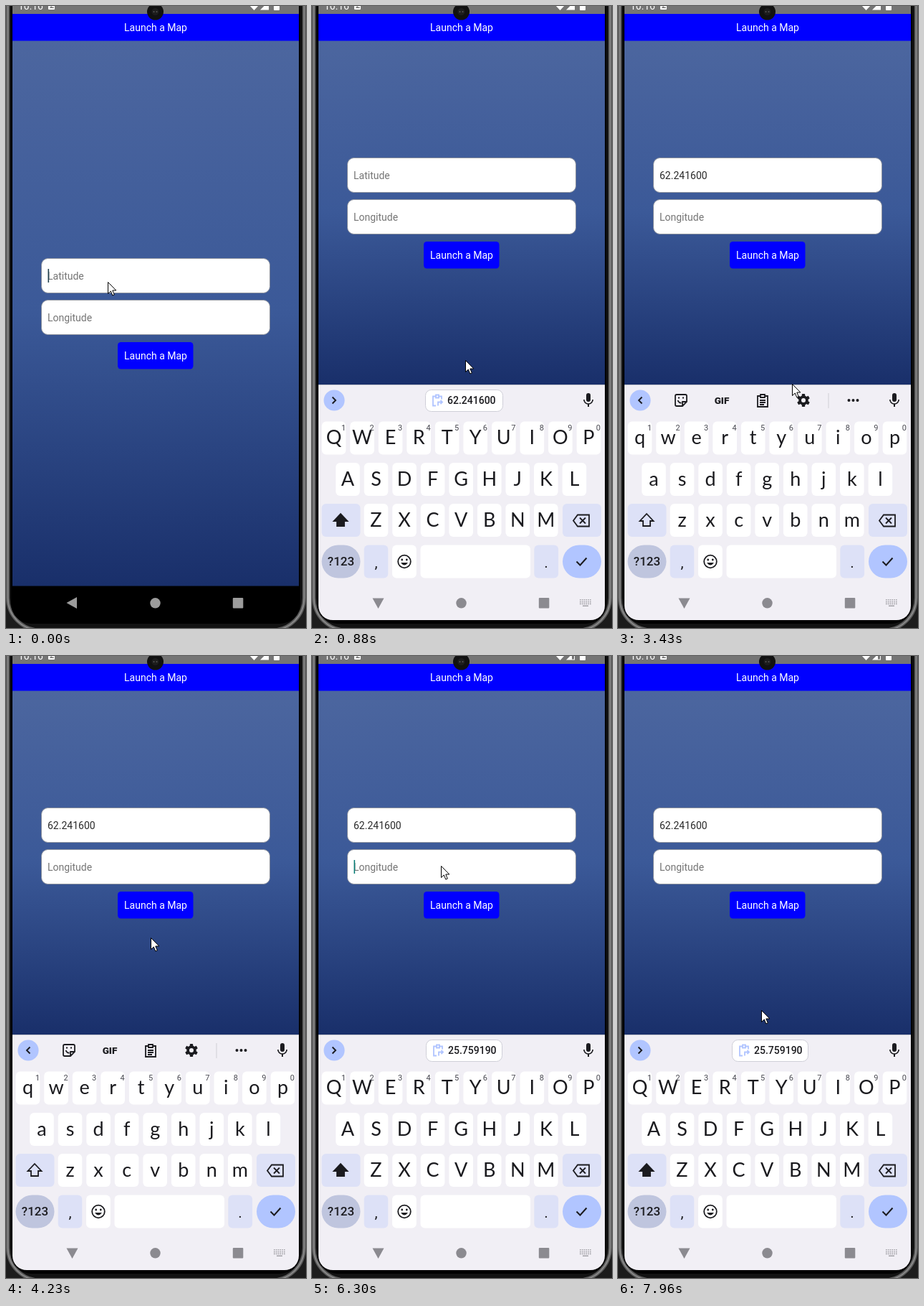
An HTML page with a canvas for the animation above (8 s loop, 419 by 866 pixels).

```html
<!DOCTYPE html>
<html lang="en">
<head>
<meta charset="utf-8">
<title>Launch a Map</title>
<style>
  html, body { margin: 0; width: 100%; height: 100%; overflow: hidden; background: #000; }
  canvas { display: block; }
</style>
</head>
<body>
<canvas id="stage" width="419" height="866"></canvas>
<script>
const LOOP = 8000, INK = '#1b1b1f', BLUE = '#b1c5ff', PALE = '#dde1f7';
const UI = 'Roboto, sans-serif', KEYS = 'Lato, sans-serif';
const stage = document.getElementById('stage').getContext('2d');
const board = new OffscreenCanvas(419, 866).getContext('2d');
let g = stage;

// time, x, y of the pointer tip
const pointerPath = [
  [0, 142, 384], [400, 142, 384], [780, 211, 486], [880, 214, 493], [1680, 225, 526],
  [2120, 232, 549], [2270, 233, 549], [3190, 233, 549], [3430, 243, 526], [3990, 223, 418],
  [4790, 152, 331], [4890, 151, 330], [5110, 134, 315], [5510, 110, 300], [5660, 110, 300],
  [6300, 180, 292], [6360, 178, 283], [6480, 167, 279], [6700, 167, 284], [7500, 217, 424],
  [7600, 216, 425], [7960, 200, 493], [8000, 200, 493]
];

const ICONS = {
  mic: 'M0 2a3 3 0 0 0 3-3V-7a3 3 0 0 0-6 0v6a3 3 0 0 0 3 3zM5.3-1a5.3 5.3 0 0 1-10.6 0H-7a7 7 0 0 0 6 6.8V9h2V5.8A7 7 0 0 0 7-1z',
  chevron: 'M-2.5-4.5 2 0-2.5 4.5',
  clipboard: 'M-3-7H-7V8H7V-7H3M-3-9H3V-5H-3zM-4-1H4M-4 2H4M-4 5H2',
  paste: 'M-2-6H-6V7H-2M2-6H6V-2M-2-8H2V-4H-2zM1 7V2H7M4.5-.5 7 2 4.5 4.5',
  sticker: 'M-6-8H6a2 2 0 0 1 2 2V2L2 8H-6a2 2 0 0 1-2-2V-6a2 2 0 0 1 2-2zM2 8V2H8M-4-3.5h2M2-3.5h2M-4.5 0q1.5 4 5 3.5',
  shift: 'M0-9 9.5 1H5V8H-5V1H-9.5z',
  erase: 'M-11 0-5-8H11V8H-5zM-2-4 6 4M6-4-2 4',
  check: 'M-7 0-2 5 7-5',
  arrow: 'M.5.5V16.5L4.3 13 6.8 19 9.3 18 6.8 12H11.8z'
};

function paint(path, fill, stroke, width = 1) {
  if (fill) { g.fillStyle = fill; g.fill(path); }
  if (stroke) { g.strokeStyle = stroke; g.lineWidth = width; g.stroke(path); }
}
function box(x, y, w, h, r, fill, stroke, width) {
  const p = new Path2D();
  p.roundRect(x, y, w, h, r);
  paint(p, fill, stroke, width);
}
function disc(x, y, r, fill, stroke, width) {
  const p = new Path2D();
  p.arc(x, y, r, 0, 7);
  paint(p, fill, stroke, width);
}
function poly(d, fill) { paint(new Path2D(d), fill); }
function icon(name, x, y, fill, stroke, width, flip = 1) {
  g.save();
  g.translate(x, y);
  g.scale(flip, 1);
  paint(new Path2D(ICONS[name]), fill, stroke, width);
  g.restore();
}
function text(s, x, y, size, color, align = 'left', weight = 400, family = UI) {
  g.font = `${weight} ${size}px ${family}`;
  g.fillStyle = color;
  g.textAlign = align;
  g.fillText(s, x, y);
}
const clamp = v => Math.max(0, Math.min(1, v));
const between = (t, a, b) => t >= a && t < b;

function pointerAt(t) {
  const i = pointerPath.findIndex(k => k[0] > t);
  const [t0, x0, y0] = pointerPath[i - 1], [t1, x1, y1] = pointerPath[i];
  const p = (t - t0) / (t1 - t0);
  return [Math.round(x0 + (x1 - x0) * p), Math.round(y0 + (y1 - y0) * p)];
}

function drawStatusBar(t) {
  box(9, 0, 400, 12, 0, '#757575');
  text('10:16', 17, 5, 14, '#fff');
  box(59, -4, 9, 9, 1, '#fff');
  poly('M61 3 63 0 65 2 66 1 67 3z', '#757575');
  poly('M339-2H354L346.5 6z', '#fff');
  poly('M355 5.5 367-6.5V5.5z', '#fff');
  if (t > 5900) poly('M363-1H366V4.5H363z', '#757575');
  box(374, -8, 8, 14, 1, '#fff');
  box(9, 11, 400, 37.5, 0, '#00f');
  text('Launch a Map', 209, 35, 14, '#fff', 'center');
  disc(208.5, 8, 11.5, '#111');
  disc(208.5, 8, 5, '#1d1d1d');
  disc(206.5, 8, 1, '#555');
  disc(210.5, 8, 1, '#555');
}

function drawField(y, label, value) {
  box(49.5, y + .5, 319, 48, 9, '#fff', '#8f949f');
  text(value || label, 58, y + 29.5, 14, value ? '#2b2b2b' : '#757575');
}

function drawForm(t, open) {
  const bottom = open ? 527.5 : 807.5, y = open ? 211 : 351;
  const sky = g.createLinearGradient(0, 48, 0, bottom);
  ['#4c669f', '#3b5998', '#192f6a'].forEach((c, i) => sky.addColorStop(i / 2, c));
  box(9, 48, 400, bottom - 48, 0, sky);
  if (open) box(9, bottom, 400, 280, 0, '#fafafa');
  drawField(y, 'Latitude', t >= 2590 && '62.241600');
  drawField(y + 58, 'Longitude');
  box(156, y + 117, 105.5, 37.5, 4.5, '#00f');
  text('Launch a Map', 209, y + 141, 14, '#fff', 'center');

  const caret = '#0b7f78';
  if (t < 580 || between(t, 1700, 2120)) box(58.5, y + 15, 1.6, 19, 0, t < 580 ? '#24434f' : caret);
  if (between(t, 2620, 3200) || between(t, 5200, 5680)) box(124.5, y + 15, 1.6, 19, 0, caret);
  if (between(t, 5720, 6850)) box(58.5, y + 73, 1.6, 19, 0, caret);
}

function drawChip(value, x, w) {
  box(x + .5, 534.5, w, 30, 8, '#fff', '#cfcfd8');
  icon('paste', x + 17, 549.5, null, BLUE, 1.8);
  text(value, x + 31, 554, 14, INK, 'left', 500);
}

function drawTools() {
  icon('sticker', 88, 549, null, INK, 1.8);
  text('GIF', 145, 554, 13.5, INK, 'center', 900);
  icon('clipboard', 202, 550, null, INK, 1.8);
  for (let i = 0; i < 6; i++) {
    g.save();
    g.translate(259, 549);
    g.rotate(i * Math.PI / 3);
    box(-2.2, -9, 4.4, 5, .8, INK);
    g.restore();
  }
  disc(259, 549, 4.9, null, INK, 3.8);
  box(293.5, 539, 1, 21, 0, '#cfcfd6');
  [-6, 0, 6].forEach(dx => disc(328.5 + dx, 549, 2, INK));
}

function drawKeyRow(letters, x, y, hints) {
  [...letters].forEach((c, i) => {
    const cx = x + i * 39.55;
    box(cx - 16.8, y, 33.6, 46, 6, '#fff');
    text(c, cx, y + 31.5, 27, INK, 'center', 400, KEYS);
    if (hints) text((i + 1) % 10, cx + 13.5, y + 12.5, 11, '#46464f', 'center');
  });
}

function drawKeyboard(t) {
  const tools = clamp((t - 2590) / 200) * (1 - clamp((t - 5680) / 200));
  const lower = between(t, 2640, 5720);
  const rows = ['QWERTYUIOP', 'ASDFGHJKL', 'ZXCVBNM'].map(r => lower ? r.toLowerCase() : r);

  g.clearRect(0, 527, 419, 339);
  box(9, 527.5, 400, 338.5, 0, '#f1eff5');
  disc(31, 549, 14.6, BLUE);
  icon('chevron', 31, 549, null, INK, 1.9, tools > .5 ? -1 : 1);
  icon('mic', 386, 549, INK);
  g.globalAlpha = (1 - tools) * clamp((t - 350) / 150);
  t < 4000 ? drawChip('62.241600', 158, 108) : drawChip('25.759190', 159, 106);
  g.globalAlpha = tools;
  drawTools();
  g.globalAlpha = 1;

  drawKeyRow(rows[0], 30.5, 578.5, true);
  drawKeyRow(rows[1], 50, 636);
  drawKeyRow(rows[2], 89.5, 693);
  box(13.5, 693, 54, 46, 6, PALE);
  icon('shift', 40, 716, lower ? null : INK, INK, 1.8);
  box(350, 693, 54, 46, 6, PALE);
  icon('erase', 376, 716.5, null, INK, 1.8);

  box(13.5, 750.5, 54, 46, 23, '#bfc5de');
  text('?123', 40.5, 779, 17, INK, 'center', 500);
  box(72.7, 750.5, 33.6, 46, 6, PALE);
  text(',', 89.5, 782, 21, INK, 'center');
  box(112, 750.5, 33.8, 46, 6, '#fff');
  disc(129, 773.5, 8.8, null, INK, 1.8);
  disc(125.7, 771, 1.4, INK);
  disc(132.3, 771, 1.4, INK);
  poly('M124 775H134Q129 782 124 775z', INK);
  box(151.5, 750.5, 153.5, 46, 6, '#fff');
  box(310.3, 750.5, 33.8, 46, 6, PALE);
  text('.', 327, 782, 21, INK, 'center');
  box(350, 750.5, 54, 46, 23, BLUE);
  icon('check', 376.5, 773.5, null, INK, 2);
}

function drawNavigation(shown) {
  const color = shown > .5 ? '#8b8a90' : '#9c9c9c';
  g.save();
  g.translate(92.5, 831);
  g.rotate(-shown * Math.PI / 2);
  poly('M-8 0 6.5-8V8z', color);
  g.restore();
  disc(208.5, 831.3, 7.2, color);
  box(316.8, 824, 14.5, 14.5, 1, color);
  if (shown < .9) return;
  for (let r = 0; r < 3; r++)
    for (let c = 0; c < 6; c++) box(374 + c * 2.8, 826 + r * 2.8, 1.6, 1.6, 0, '#a3a2a8');
  box(378, 834.5, 8, 1.6, 0, '#a3a2a8');
}

function drawBezel() {
  box(0, 0, 419, 866, 0, '#1c1c1c');
  box(2.5, -80, 414, 949, 45, '#121212', '#5c5c5c', 5);
  box(2.5, -80, 414, 949, 45, null, '#8c8c8c', 1.6);
  box(7, -80, 404, 940, 28, '#000');
}

function frame() {
  const t = performance.now() % LOOP;
  const open = t >= 50;
  const p = open ? clamp((t - 30) / 285) : 0;

  g = stage;
  drawBezel();
  g.save();
  g.beginPath();
  g.roundRect(9, -40, 400, 895, 20);
  g.clip();
  box(9, 0, 400, 866, 0, '#000');
  drawForm(t, open);
  drawStatusBar(t);
  if (open) {
    g = board;
    drawKeyboard(t);
    g = stage;
    g.globalAlpha = Math.min(1, p * 1.7);
    g.drawImage(board.canvas, 0, 527, 419, 339, 0, 527 + Math.round(330 * (1 - p) ** 3), 419, 339);
    g.globalAlpha = 1;
  }
  drawNavigation(clamp(p * 2 - 1));
  g.restore();
  icon('arrow', ...pointerAt(t), '#fff', '#000', 1);
  requestAnimationFrame(frame);
}
frame();
</script>
</body>
</html>
```
